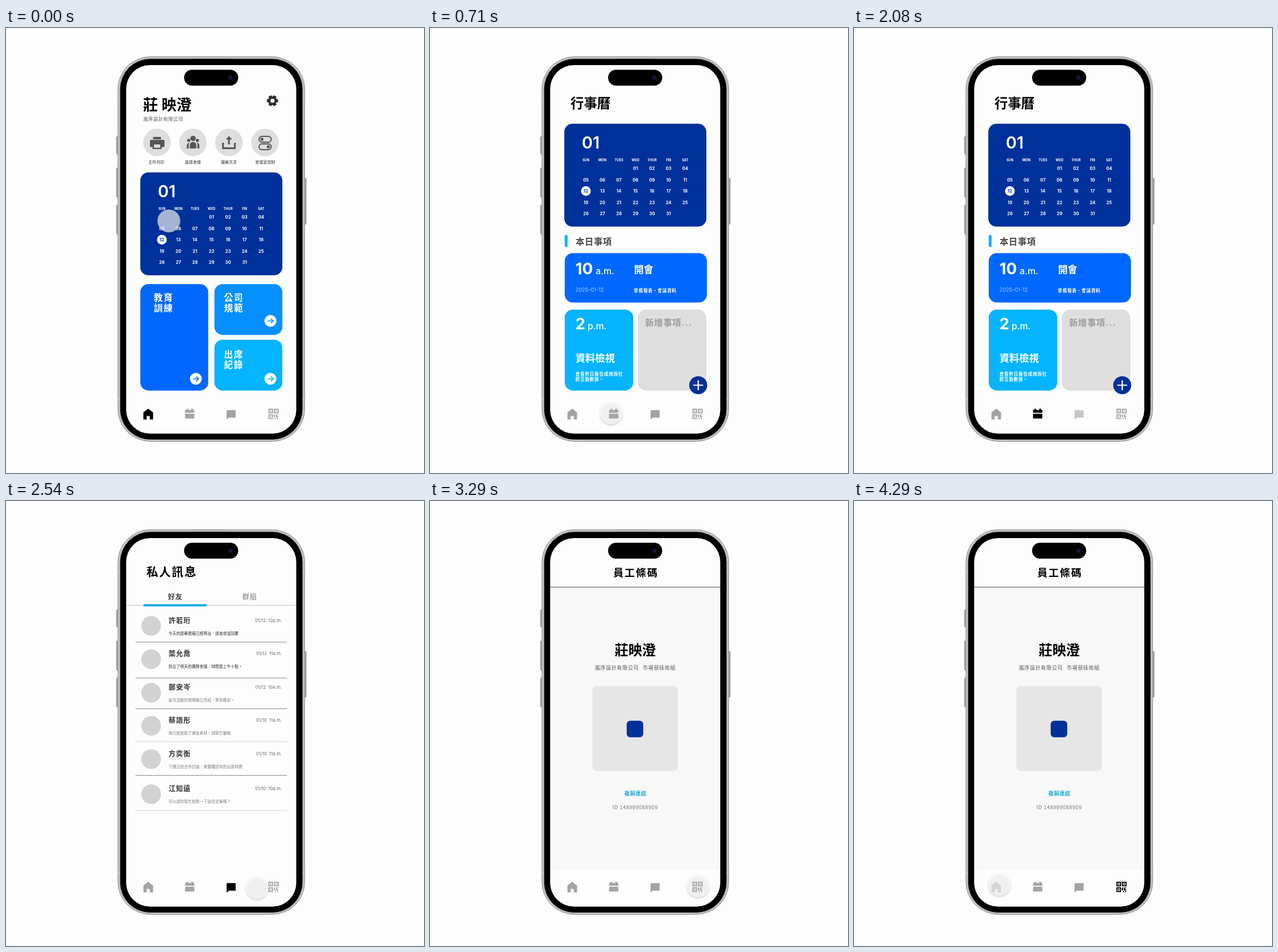
Write an HTML page that moves like this. It is 720x768 px and loops after 4330 ms.

```html
<!DOCTYPE html>
<html lang="zh-Hant">
<head>
<meta charset="utf-8">
<title>App prototype</title>
<style>
html, body { margin: 0; width: 100%; height: 100%; overflow: hidden; background: #fdfdfd; }
svg { display: block; width: 720px; height: 768px; }
text { font-family: Inter, 'Noto Sans CJK TC', 'Noto Sans CJK JP', 'Noto Sans CJK', sans-serif; white-space: pre; }
.b { font-weight: 700; }
.mid { text-anchor: middle; }
.white { fill: #fff; }
.label { font-size: 6.7px; letter-spacing: .2px; font-weight: 500; fill: #333; text-anchor: middle; }
.tile { font-size: 15.4px; letter-spacing: 1.6px; font-weight: 700; fill: #fff; }
.hour { font-size: 27px; font-weight: 700; fill: #fff; }
.half { font-size: 15.4px; font-weight: 500; fill: #fff; }
.note { font-size: 7.5px; letter-spacing: .7px; font-weight: 700; fill: #fff; }
.day { font-size: 7.5px; font-weight: 700; fill: #fff; text-anchor: middle; }
.week { font-size: 5.7px; font-weight: 700; fill: #fff; text-anchor: middle; }

.page { visibility: hidden; animation: 4330ms step-end infinite; }
#home { animation-name: home; }
#plan { animation-name: plan; }
#chat { animation-name: chat; }
#card { animation-name: card; }
@keyframes home { 0% { visibility: visible } 16.17%, 100% { visibility: hidden } }
@keyframes plan { 0% { visibility: hidden } 16.17% { visibility: visible } 49.19%, 100% { visibility: hidden } }
@keyframes chat { 0% { visibility: hidden } 49.19% { visibility: visible } 75.75%, 100% { visibility: hidden } }
@keyframes card { 0% { visibility: hidden } 75.75%, 100% { visibility: visible } }

#touch {
  fill: #fff; fill-opacity: .65;
  filter: drop-shadow(0 2px 1.5px rgba(0, 0, 0, .26));
  animation: move 4330ms linear infinite, fade 4330ms linear infinite;
}
@keyframes move {
  0%, 1.8% { transform: translate(280.5px, 333px); animation-timing-function: ease-in-out; }
  12%, 19.6% { transform: translate(312px, 664px); animation-timing-function: ease-in; }
  28.87% { transform: translate(357.5px, 671px); animation-timing-function: ease-out; }
  37.9%, 45% { transform: translate(388px, 672px); }
  51% { transform: translate(391px, 667px); }
  58.66% { transform: translate(432.5px, 667px); }
  62.6% { transform: translate(438px, 666px); animation-timing-function: ease-in-out; }
  71.6%, 81.3% { transform: translate(461.5px, 664px); animation-timing-function: ease-in-out; }
  97.7%, 100% { transform: translate(250.5px, 661.5px); }
}
@keyframes fade {
  0%, 45%, 51%, 100% { opacity: 1; filter: drop-shadow(0 2px 1.5px rgba(0, 0, 0, .26)); }
  48%, 49.19% { opacity: .6; filter: drop-shadow(0 2px 1.5px rgba(0, 0, 0, 0)); }
}
</style>
</head>
<body>
<svg viewBox="0 0 720 768">
  <defs>
    <path id="iHome" d="M245 657l8.300 6.600v12h-5.600v-6h-5.400v6h-5.600v-12z"/>
    <path id="iPlan" d="M310.800 657h2.800v2.200h5.600v-2.200h2.800v2.200h2.300v4.800h-15.800v-4.800h2.300zM308.500 665.700h15.800v8.300h-15.800z"/>
    <path id="iChat" d="M380 659.500h15.500v13h-12l-3.500 3.500z"/>
    <g id="iCode">
      <path id="eye" fill-rule="evenodd" d="M452 657h8v8h-8zM453.700 658.700v4.600h4.600v-4.600zM455 660h2v2h-2z"/>
      <use href="#eye" x="9.500"/>
      <use href="#eye" y="9.800"/>
      <path d="M461.500 667h2v5h-2zM465 667h1.800v3h2.200v2h-4zM467.500 666.800h1.500v1.500h-1.500zM463 673h2v1.800h-2zM467 673h2v1.800h-2z"/>
    </g>
    <g id="go">
      <circle r="10.200" fill="#fff"/>
      <path d="M-4.800 0h9M.500-4.200L4.700 0 .500 4.200" fill="none" stroke="currentColor" stroke-width="1.500"/>
    </g>
    <g id="month">
      <rect x="231.300" y="249.300" width="244.700" height="177.500" rx="14" fill="#00309a"/>
      <text class="white" x="261.500" y="292" font-size="28.500" font-weight="600">01</text>
    </g>
  </defs>

  <!-- phone body -->
  <g fill="#a8a8a8" stroke="#7c7c7c" stroke-width=".8">
    <rect x="190.300" y="187.500" width="5" height="30" rx="1"/>
    <rect x="190.300" y="241.500" width="5" height="50" rx="1"/>
    <rect x="190.300" y="305.500" width="5" height="50" rx="1"/>
    <rect x="512" y="259.500" width="5" height="79" rx="1"/>
    <rect x="192.800" y="49.500" width="321.700" height="664" rx="56" fill="#c6c6c6" stroke="#8a8a8a" stroke-width="1"/>
  </g>
  <rect x="196.300" y="53" width="314.700" height="657.500" rx="52.500" stroke="#8a8a8a" stroke-width="1"/>
  <path d="M321 53.500h65" stroke="#333" stroke-width="1.200"/>
  <path d="M193 121h3M511 121h3M193 641h3M511 641h3M447 50v2M262 711v2" stroke="#d6d6d6" stroke-width="1.500"/>
  <rect x="207" y="64" width="293" height="636" rx="41" fill="#fdfdfd"/>
  <rect x="306.700" y="72" width="93.300" height="27.500" rx="13.750"/>
  <circle cx="386.500" cy="86" r="4.200" fill="#100e2b"/>
  <circle cx="386.500" cy="86" r="1.800" fill="#26235c"/>

  <g fill="#a3a3a3">
    <use href="#iHome"/><use href="#iPlan"/><use href="#iChat"/><use href="#iCode"/>
  </g>

  <g id="home" class="page">
    <text class="b" x="236" y="141.500" font-size="25.800">莊 映澄</text>
    <text x="236.500" y="159.600" font-size="8.100" letter-spacing=".5" fill="#555">嵐序設計有限公司</text>
    <g transform="translate(459 125.500)" fill="#2b2b31">
      <circle r="7.400"/>
      <g id="cog"><rect x="-9.600" y="-3" width="19.200" height="6" rx="1.500"/></g>
      <use href="#cog" transform="rotate(60)"/>
      <use href="#cog" transform="rotate(120)"/>
      <circle r="3.500" fill="#fdfdfd"/>
    </g>
    <g fill="#dedede">
      <circle cx="260" cy="197.500" r="23.800"/><circle cx="322" cy="197.500" r="23.800"/>
      <circle cx="384" cy="197.500" r="23.800"/><circle cx="446" cy="197.500" r="23.800"/>
    </g>
    <g fill="#555">
      <path d="M253.500 188h13.500v4h-13.500z"/>
      <rect x="248" y="193" width="25" height="12.500" rx="2"/>
      <path d="M252.500 199h15.500v10h-15.500z"/>
      <path d="M255 201h10.500v5.700h-10.500z" fill="#dedede"/>
      <circle cx="322.200" cy="190.500" r="4.600"/>
      <circle cx="314.800" cy="194" r="2.800"/><circle cx="329.600" cy="194" r="2.800"/>
      <path d="M316.700 208v-6a5.500 5.500 0 0 1 11 0v6zM311.500 208v-5.500q0-4 4.300-4.500-1 2-1 4v6zM333 208v-5.500q0-4-4.300-4.500 1 2 1 4v6z"/>
      <path d="M384 186.500l5.500 6h-4v8.500h-3v-8.500h-4zM372.300 198h3v8h17.400v-8h3v11h-23.400z"/>
      <circle cx="440.800" cy="192" r="2.700"/><circle cx="451.800" cy="205" r="2.700"/>
      <g fill="none" stroke="#555" stroke-width="2">
        <rect x="435.800" y="187" width="21" height="10" rx="5"/>
        <rect x="435.800" y="200" width="21" height="10" rx="5"/>
      </g>
    </g>
    <text class="label" x="259" y="233.500">文件列印</text>
    <text class="label" x="322" y="233.500">遠端會議</text>
    <text class="label" x="384" y="233.500">檔案共享</text>
    <text class="label" x="446.500" y="233.500">會議室控制</text>
    <use href="#month"/>
    <rect x="231.300" y="442" width="117" height="183.700" rx="14" fill="#0068ff"/>
    <rect x="359" y="442" width="117" height="87.700" rx="14" fill="#058fff"/>
    <rect x="359" y="538" width="117" height="87.700" rx="14" fill="#05b4ff"/>
    <text class="tile" x="254.500" y="471.300">教育<tspan x="254.500" dy="18">訓練</tspan></text>
    <text class="tile" x="375.500" y="471.300">公司<tspan x="375.500" dy="18">規範</tspan></text>
    <text class="tile" x="375.500" y="569">出席<tspan x="375.500" dy="18">紀錄</tspan></text>
    <use href="#go" x="327" y="605.500" color="#0068ff"/>
    <use href="#go" x="455.500" y="505.500" color="#058fff"/>
    <use href="#go" x="455.500" y="605.500" color="#05b4ff"/>
    <use href="#iHome"/>
  </g>

  <g id="plan" class="page">
    <text class="b" x="242" y="137.500" font-size="23">行事曆</text>
    <use href="#month" y="-84"/>
    <rect x="232" y="357" width="5" height="21" rx="2.500" fill="#05b4ff"/>
    <text class="b" x="251" y="374" font-size="15" letter-spacing=".6" fill="#444">本日事項</text>
    <rect x="232" y="388.500" width="245" height="85.300" rx="14" fill="#0068ff"/>
    <text class="hour" x="250.500" y="425">10</text>
    <text class="half" x="285.500" y="425">a.m.</text>
    <text x="250.500" y="455.300" font-size="9" fill="#a9ccff">2025-01-12</text>
    <text class="b white" x="351.500" y="422.500" font-size="16.500">開會</text>
    <text class="note" x="351" y="455.500">準備報表、會議資料</text>
    <rect x="232" y="486" width="118" height="139.700" rx="14" fill="#05b4ff"/>
    <text class="hour" x="250.500" y="520">2</text>
    <text class="half" x="271.500" y="520">p.m.</text>
    <text class="b white" x="250.500" y="576.300" font-size="17">資料檢視</text>
    <text class="note" x="250.500" y="600.300">查看昨日廣告成效與社<tspan x="250.500" dy="9">群互動數據。</tspan></text>
    <rect x="358" y="486" width="118" height="139.700" rx="14" fill="#dedede"/>
    <text class="b" x="370.500" y="513.500" font-size="15" letter-spacing=".6" fill="#9c9c9c">新增事項<tspan letter-spacing="1.300">...</tspan></text>
    <circle cx="462" cy="616.500" r="15.500" fill="#00309a"/>
    <path d="M453.500 616.500h17M462 608v17" stroke="#fff" stroke-width="2.200"/>
    <use href="#iPlan"/>
  </g>

  <g id="chat" class="page">
    <text class="b" x="242" y="130" font-size="20" letter-spacing="1.800">私人訊息</text>
    <text class="b" x="279" y="170" font-size="12" letter-spacing=".5" fill="#444">好友</text>
    <text class="b" x="407" y="170" font-size="12" letter-spacing=".8" fill="#a3a3a3">群組</text>
    <path d="M207 180.300h293" stroke="#d6d6d6" stroke-width="1.500"/>
    <rect x="236.500" y="178" width="109.500" height="4" rx="2" fill="#1cb0f0"/>
    <use href="#iChat"/>
  </g>

  <g id="card" class="page">
    <path d="M207 149h293v487h-293z" fill="#f8f8f8"/>
    <path d="M207 148.500h293" stroke="#555"/>
    <text class="b mid" x="354.500" y="129.600" font-size="17.600" letter-spacing="1.800">員工條碼</text>
    <text class="b mid" x="353.500" y="266.300" font-size="23.700">莊映澄</text>
    <text x="284" y="290.800" font-size="8.800" letter-spacing=".65" fill="#555">嵐序設計有限公司<tspan x="366.500">市場部技術組</tspan></text>
    <rect x="279.700" y="319.300" width="147.300" height="147" rx="8" fill="#e6e6e6"/>
    <rect x="338.800" y="379.300" width="28.500" height="28.500" rx="6" fill="#00309a"/>
    <text class="b mid" x="353.800" y="507.800" font-size="9.100" letter-spacing=".3" fill="#18a9d8">複製連結</text>
    <text class="mid" x="353.500" y="532" font-size="9" letter-spacing=".5" fill="#777" style="font-family:'Noto Sans CJK TC','Noto Sans',sans-serif">ID 148999088909</text>
    <use href="#iCode"/>
  </g>

  <circle id="touch" r="19.700"/>
</svg>
<script>
const NS = 'http://www.w3.org/2000/svg';
const $ = id => document.getElementById(id);

function add(parent, tag, attrs, text = '') {
  const el = document.createElementNS(NS, tag);
  for (const key in attrs) el.setAttribute(key, attrs[key]);
  el.textContent = text;
  parent.append(el);
}

function buildMonth() {
  const month = $('month');
  const colX = col => 268.5 + col * 28.5;
  ['SUN', 'MON', 'TUES', 'WED', 'THUR', 'FRI', 'SAT'].forEach((name, col) =>
    add(month, 'text', { class: 'week', x: colX(col), y: 313.6 }, name));
  for (let day = 1; day <= 31; day++) {
    const cell = day + 2;
    const x = colX(cell % 7);
    const y = 326.2 + Math.floor(cell / 7) * 19.6;
    const today = day === 12;
    if (today) add(month, 'circle', { cx: x, cy: y, r: 8.4, fill: '#fff' });
    add(month, 'text', { class: 'day', x, y: y + 2.7, style: today ? 'fill:#00309a' : '' },
      String(day).padStart(2, '0'));
  }
}

function buildChat() {
  const chat = $('chat');
  // avatar y, divider y, name, time, message
  const rows = [
    [215.5, 243.5, '許若珩', '01/12  12p.m.', '今天的提案簡報已經寄出，請查收並回覆'],
    [273, 305.5, '葉允喬', '01/12  11a.m.', '別忘了明天的團隊會議，時間是上午十點。'],
    [331, 358.5, '鄭安岑', '01/12  10a.m.', '這次活動的視覺稿已完成，等你確認。'],
    [388, 415.5, '蔡語彤', '01/10  11a.m.', '我已經更新了廣告素材，請幫忙審核'],
    [445.5, 473.5, '方奕衡', '01/10  11a.m.', '下週五的合作討論，需要確認你的出席時間'],
    [506, 534, '江知遠', '01/10  10a.m.', '可以請你幫忙校對一下這份文案嗎？']
  ];
  rows.forEach(([y, line, name, time, message], i) => {
    add(chat, 'circle', { cx: 250, cy: y, r: 17, fill: '#d2d2d2' });
    add(chat, 'text', { class: 'b', x: 280, y: y - 5, 'font-size': 12, 'letter-spacing': .8, fill: '#333' }, name);
    add(chat, 'text', { x: 475, y: y - 6.7, 'font-size': 7.6, 'text-anchor': 'end', fill: '#666' }, time);
    add(chat, 'text', { x: 280, y: y + 15.3, 'font-size': 6.6, 'letter-spacing': .1, fill: i < 2 ? '#222' : '#777' }, message);
    add(chat, 'path', { d: `M223 ${line}h261`, stroke: i === 3 || i === 5 ? '#d0d0d0' : '#8c8c8c' });
  });
}

buildMonth();
buildChat();
</script>
</body>
</html>
```
